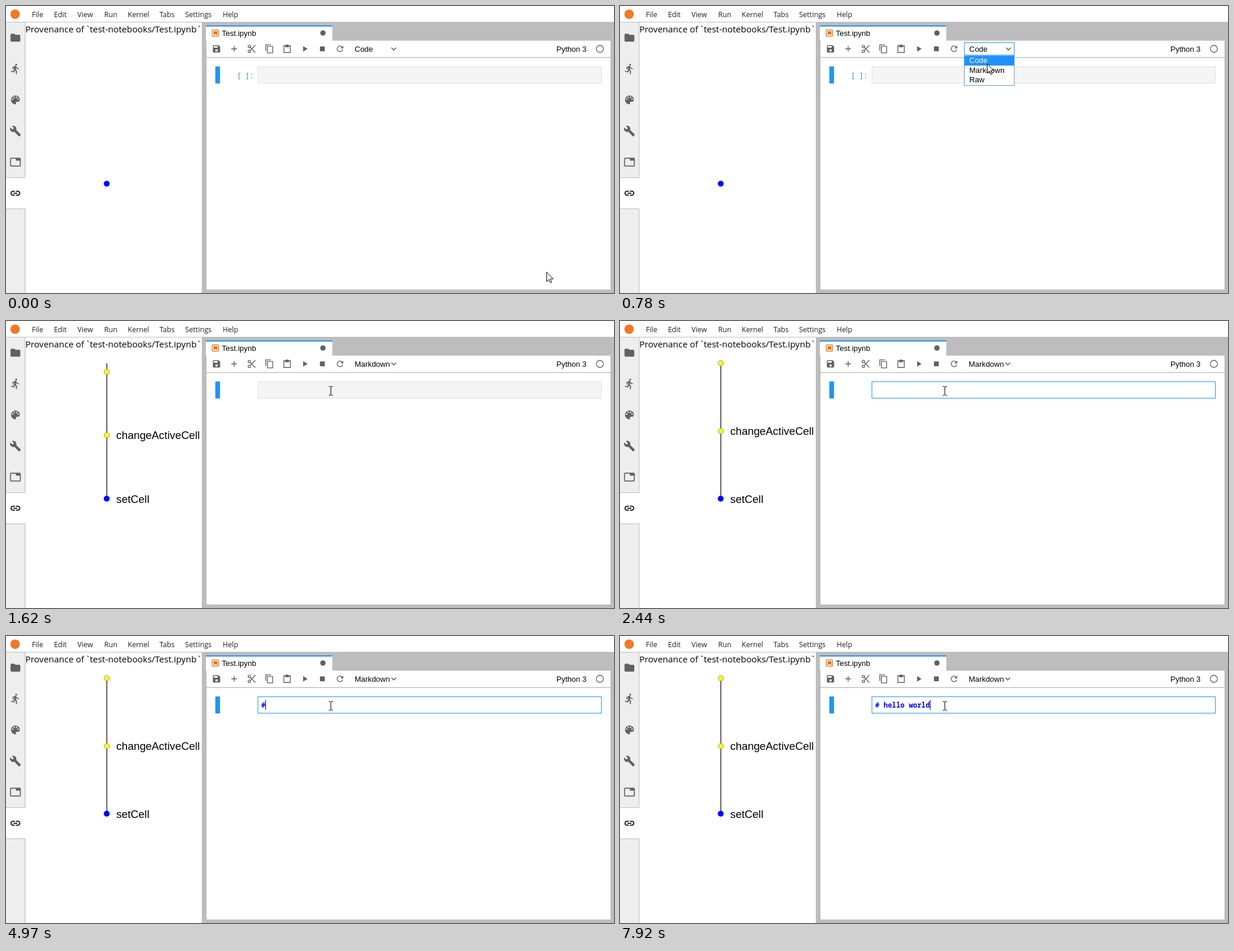
Write an HTML page that moves like this. It is 1034 by 489 pixels and loops after 8000 ms.

```html
<!DOCTYPE html>
<html lang="en">
<head>
<meta charset="utf-8">
<title>Notebook provenance</title>
<style>
  html, body { margin: 0; width: 100%; height: 100%; overflow: hidden; background: #fff; }
  svg { display: block; }
  text { white-space: pre; font: 13px "Liberation Sans", Arial, sans-serif; fill: #000; }
  .menu text { font: 12.2px "Open Sans", sans-serif; fill: #212121; }
  .title { font: 15px "Open Sans", sans-serif; }
  .label text { font-size: 18.4px; }
  .mono { font: 11.91px "Noto Sans Mono", monospace; }
  .icon { fill: #616161; stroke: none; }
  .line { fill: none; stroke: #616161; stroke-width: 2; }
</style>
</head>
<body>
<svg width="1034" height="489" viewBox="0 0 1034 489">
  <!-- window areas -->
  <rect width="1034" height="489" fill="#fff"/>
  <rect y="27" width="1034" height="462" fill="#bdbdbd"/>
  <rect y="28" width="32" height="461" fill="#eee"/>
  <rect x="33" y="28" width="300" height="461" fill="#fff"/>
  <path d="M0 292.5H33V345.5H0Z" fill="#fff"/>
  <path d="M0 292.5H32.5M0 345.5H32.5" stroke="#bdbdbd"/>
  <rect x="341" y="59" width="687" height="424" fill="#fff"/>
  <rect x="340" y="33" width="215" height="26" fill="#fff"/>
  <rect x="340" y="33" width="215" height="2" fill="#2196f3"/>
  <rect x="341" y="87" width="687" height="1" fill="#bdbdbd"/>
  <rect x="341" y="88" width="687" height="1" fill="#e4e4e4"/>

  <circle cx="15.5" cy="14" r="8" fill="#f37726"/>
  <g class="menu" id="menu"></g>
  <g id="icons"></g>

  <!-- notebook tab and toolbar -->
  <rect x="350.6" y="40.6" width="10.8" height="10.8" rx="1" fill="none" stroke="#ef6c00" stroke-width="1.3"/>
  <path d="M353 43H359.5V50L356.2 47.4L353 50Z" fill="#ef6c00"/>
  <text x="367" y="51">Test.ipynb</text>
  <circle cx="539" cy="46" r="4.6" fill="#616161"/>
  <text x="936" y="78" fill="#212121">Python 3</text>
  <circle cx="1010" cy="73" r="6" fill="none" stroke="#616161" stroke-width="1.3"/>

  <!-- provenance graph -->
  <text class="title" y="45"><tspan x="33">Provenance of</tspan><tspan x="135">`</tspan><tspan x="142.5">test-notebooks/Test.ipynb</tspan><tspan x="324">`</tspan></text>
  <g id="graph" class="label">
    <path d="M171.5 72V303" stroke="#000" stroke-width="1.2"/>
    <g id="root"><circle cx="171.5" r="4.6" fill="#ff0" stroke="#8c8c8c" stroke-width=".9"/></g>
    <g id="active">
      <circle cx="171.5" r="4.6" fill="#ff0" stroke="#8c8c8c" stroke-width=".9"/>
      <text x="187.5" y="6.5">changeActiveCell</text>
    </g>
    <text x="187.5" y="310">setCell</text>
  </g>
  <circle cx="171.3" cy="302.7" r="5" fill="#00f"/>

  <!-- cell -->
  <rect x="356" y="103" width="8" height="29" rx="1" fill="#2196f3"/>
  <text id="prompt" class="mono" x="392.8" y="122.5" style="fill:#307fc1">[ ]:</text>
  <rect id="cell" x="428.5" y="103.5" width="584" height="28"/>
  <text id="code" class="mono" x="434" y="122" style="fill:#00f;font-weight:bold"></text>
  <rect id="caret" y="109" width="1" height="17"/>

  <!-- cell type selector -->
  <rect id="select" x="585.5" y="62.5" width="85" height="21"/>
  <text id="kind" y="78"></text>
  <path id="chevron" d="M655.5 71L659.5 75L663.5 71" fill="none" stroke="#555" stroke-width="1.5"/>
  <g id="list">
    <rect x="585.5" y="83.5" width="85" height="52" fill="#fff" stroke="#5b9be0"/>
    <rect id="highlight" x="586" width="84" height="17" fill="#1e90ff"/>
    <text x="594" y="97">Code</text>
    <text x="594" y="114">Markdown</text>
    <text x="594" y="130">Raw</text>
  </g>

  <!-- mouse pointers, drawn around their hot spots -->
  <path id="arrow" d="M.5 .5V16.5L4.2 13L6.7 18.6L9 17.6L6.6 12H11.5Z" fill="#fff" stroke="#000"/>
  <path id="beam" d="M-3 -7.5H-1L.5 -6.5L2 -7.5H4M.5 -6.5V6.5M-3 7.5H-1L.5 6.5L2 7.5H4" fill="none" stroke="#000"/>
</svg>
<script>
const $ = id => document.getElementById(id);
const set = (id, attrs) => { for (const k in attrs) $(id).setAttribute(k, attrs[k]); };
const show = (id, on) => $(id).style.display = on ? '' : 'none';
const move = (id, x, y) => set(id, { transform: `translate(${x} ${y})` });

const menu = { File: 44, Edit: 81.5, View: 121.5, Run: 167, Kernel: 207, Tabs: 261, Settings: 304.5, Help: 368.5 };
$('menu').innerHTML = Object.entries(menu)
  .map(([name, x]) => `<text x="${x}" y="19">${name}</text>`).join('');

// Icons live on a 24-unit grid.
const solid = d => `<path class="icon" fill-rule="evenodd" d="${d}"/>`;
const stroke = d => `<path class="line" d="${d}"/>`;
const dot = (x, y, r, fill) => `<circle cx="${x}" cy="${y}" r="${r}" fill="${fill}"/>`;
const ring = (x, y, r) => `<circle class="line" cx="${x}" cy="${y}" r="${r}"/>`;
const icon = (x, y, size, body) =>
  `<g transform="translate(${x - size / 2} ${y - size / 2}) scale(${size / 24})">${body}</g>`;

const side = [
  solid('M10 4H4Q2 4 2 6V18Q2 20 4 20H20Q22 20 22 18V8Q22 6 20 6H12Z'),
  dot(13.5, 3.5, 2, '#616161') +
    solid('M9.9 19.4L10.9 15L13 17V23H15V15.5L12.9 13.5L13.5 10.5Q15.6 13 19 13V11Q16.2 11 14.7 8.6L13.7 7Q12.7 5.6 11.2 6.1L6 8.3V13H8V9.6L9.8 8.9L8.2 17L3.3 16L2.9 18Z'),
  solid('M12 3A9 9 0 0 0 12 21Q13.5 21 13.5 19.5Q13.4 18.9 13.1 18.5Q12.2 16.4 14.2 16H16Q21 16 21 11C21 6.6 17 3 12 3Z') +
    [[6.5, 10.5], [9.5, 6.5], [14.5, 6.5], [17.5, 10.5]].map(([x, y]) => dot(x, y, 1.5, '#eee')).join(''),
  solid('M22.7 19L13.6 9.9C14.5 7.6 14 4.9 12.1 3C10.1 1 7.1 .6 4.7 1.7L9 6L6 9L1.6 4.7C.4 7.1 .9 10.1 2.9 12.1C4.8 14 7.5 14.5 9.8 13.6L18.9 22.7Q19.6 23.3 20.3 22.7L22.6 20.4Q23.3 19.7 22.7 19Z'),
  solid('M3 3H21Q23 3 23 5V19Q23 21 21 21H3Q1 21 1 19V5Q1 3 3 3ZM3 5V19H21V9H13V5Z'),
  '<path d="M11 8H7A4 4 0 0 0 7 16H11M13 8H17A4 4 0 0 1 17 16H13M8 12H16" fill="none" stroke="#111" stroke-width="2.1"/>'
];
const tools = [
  solid('M17 3H5Q3 3 3 5V19Q3 21 5 21H19Q21 21 21 19V7ZM5 5H15V9H5ZM12 13A3 3 0 0 1 12 19A3 3 0 0 1 12 13Z'),
  stroke('M12 5V19M5 12H19'),
  ring(6, 6, 3) + ring(6, 18, 3) + stroke('M8 8L21 21M8 16L21 3') + dot(12, 12, 1.6, '#616161'),
  stroke('M3 17V2H16M7 6H20V22H7Z'),
  stroke('M4 4H20V21H4Z') + solid('M7 3H9.5A2.6 2.6 0 0 1 14.5 3H17V8H7Z'),
  solid('M8 5V19L19 12Z'),
  solid('M6 6H18V18H6Z'),
  stroke('M17.5 7.5A7 7 0 1 0 18.8 14') + solid('M20 4V11H13Z')
];
$('icons').innerHTML =
  side.map((body, i) => icon(16, 54 + 53 * i, 20, body)).join('') +
  tools.map((body, i) => icon(358 + 30 * i, 73, 16.5, body)).join('');

const LOOP = 8000, OPEN = 560, CLOSE = 1320, FOCUS = 1900;
const pointer = [
  [0, 919, 453], [60, 880, 402], [120, 790, 268], [200, 700, 150], [260, 647, 88], [330, 630, 67],
  [700, 628, 80], [780, 624, 98], [860, 624, 101], [1090, 625, 102],
  [1320, 627, 104], [1400, 612, 108], [1480, 575, 116], [1540, 555, 119], [1620, 552, 119],
  [1680, 552, 119], [1760, 552, 119]
];
const message = '# hello world';
const keyTimes = [2900, 5530, 6730, 6810, 6950, 7110, 7250, 7390, 7470, 7550, 7690, 7770, 7920];
const caretOff = [[2440, 2900], [3440, 3900], [4440, 4970], [6050, 6590]];
const easeCubic = u => u < .5 ? 4 * u ** 3 : 1 - 4 * (1 - u) ** 3;

function draw(t) {
  const [stepTime, x, y] = pointer.filter(p => p[0] <= t).pop();
  const closed = t >= CLOSE, open = t >= OPEN && !closed, focused = t >= FOCUS;
  show('arrow', !closed);
  show('beam', closed);
  move(closed ? 'beam' : 'arrow', x, y);

  const hover = t >= 330 && t < OPEN;
  set('select', { fill: hover ? '#eee' : '#fff', stroke: open ? '#2196f3' : hover ? '#eee' : '#fff' });
  $('kind').textContent = closed ? 'Markdown' : 'Code';
  set('kind', { x: open ? 594 : 593 });
  move('chevron', open ? 1 : 0, 0);
  show('list', open);
  const selected = t < 860 ? 0 : 1;
  set('highlight', { y: 84.5 + 17 * selected });
  $('list').querySelectorAll('text').forEach((row, i) => row.style.fill = i === selected ? '#fff' : '#000');

  show('graph', closed);
  const progress = easeCubic(Math.min(1, Math.max(0, (stepTime - CLOSE) / 400)));
  move('root', 0, 302.7 - 230.7 * progress);
  move('active', 0, 302.7 - 115.2 * progress);

  show('prompt', !closed);
  set('cell', { fill: focused ? '#fff' : '#f5f5f5', stroke: focused ? '#2196f3' : '#e0e0e0' });
  const typed = keyTimes.filter(k => k <= t).length;
  $('code').textContent = message.slice(0, typed);
  show('caret', focused && !caretOff.some(([from, to]) => t >= from && t < to));
  set('caret', { x: Math.round(434 + 7.147 * typed) });
}

const start = performance.now();
function tick() {
  draw((performance.now() - start) % LOOP);
  requestAnimationFrame(tick);
}
tick();
</script>
</body>
</html>
```
